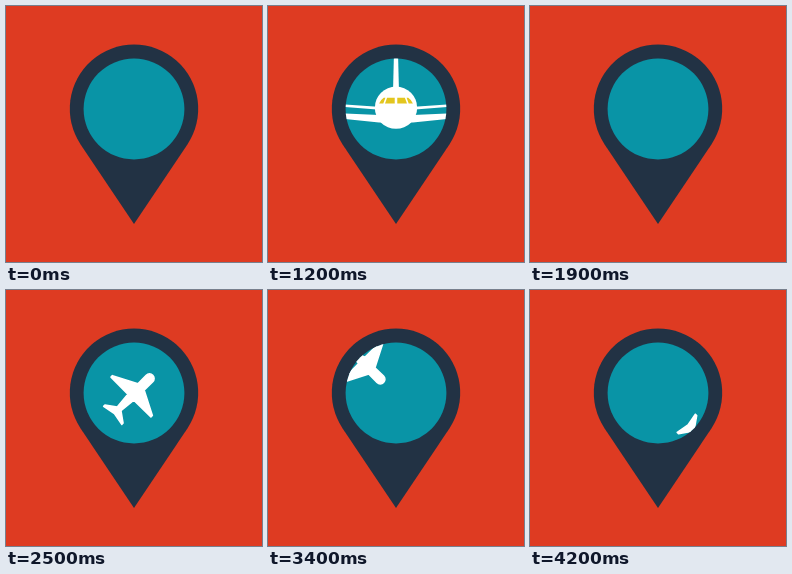
These frames come from a looping animation (256 px wide and 256 px high, 4300 ms). An HTML page:

```html
<!DOCTYPE html>
<html lang="en">
<head>
<meta charset="utf-8">
<title>Flight pin</title>
<style>
html, body { margin: 0; width: 100%; height: 100%; overflow: hidden; background: #de3b22; }
svg { display: block; width: 100%; height: 100%; }
</style>
</head>
<body>
<svg viewBox="0 0 256 256">
  <defs>
    <clipPath id="porthole"><circle cx="128" cy="103" r="50.4"/></clipPath>
  </defs>
  <rect width="256" height="256" fill="#de3b22"/>
  <path d="M74.6 138.4A64.2 64.2 0 1 1 181.4 138.4L128 218Z" fill="#223244"/>
  <circle cx="128" cy="103" r="50.4" fill="#0994a6"/>
  <g clip-path="url(#porthole)" fill="#fff">
    <!-- Head-on view, fuselage radius 1 -->
    <g id="front">
      <path d="M-.08-3.2H.08L.14-.8H-.14Z"/>
      <path d="M-2.75-.18L0 .02L2.75-.18V-.06L0 .16L-2.75-.06Z"/>
      <path d="M-4.95.17L-.8.34H.8L4.95.17V.28L.8.7H-.8L-4.95.28Z"/>
      <circle cx="-2.74" cy="1.02" r=".48"/>
      <circle cx="2.74" cy="1.02" r=".48"/>
      <circle r="1"/>
      <g fill="#e3c61f">
        <path id="panes" d="M-.06-.47H-.42L-.52-.2H-.06ZM-.5-.47L-.6-.2H-.8Q-.72-.38-.58-.47Z"/>
        <use href="#panes" transform="scale(-1 1)"/>
      </g>
    </g>
    <!-- View from above, heading right, origin at the nose centre -->
    <g id="top" stroke="#fff" stroke-width="1.6" stroke-linejoin="round">
      <path d="M0-4.6A4.6 4.6 0 0 1 0 4.6L-12 4.4L-24.2 28.2L-26.2 28.2L-26.4 4.2L-43 2.6L-50.2 12.8L-52 12.8L-49.6 0L-52-12.8L-50.2-12.8L-43-2.6L-26.4-4.2L-26.2-28.2L-24.2-28.2L-12-4.4Z"/>
    </g>
  </g>
</svg>
<script>
const LOOP = 4300, STEP = 100;
const front = document.getElementById('front');
const topView = document.getElementById('top');

function place(el, visible, transform) {
  el.style.display = visible ? '' : 'none';
  if (visible) el.setAttribute('transform', transform);
}

function approach(t) {
  const size = 10.2 * Math.pow(1.2, (t - 800) / 100);
  const y = t < 900
    ? 98.2 + (t - 900) * 0.0375
    : 102.5 - 4.3 * Math.exp((900 - t) / 180);
  return `translate(128 ${y}) scale(${size})`;
}

function flyUp(t) {
  const d = (t - 2500) * 0.098;
  return `translate(${143.5 + d} ${88.5 - d}) rotate(-45)`;
}

function flyDown(t) {
  const d = (t - 3400) * 0.101;
  return `translate(${112.3 + d} ${89.3 + d}) rotate(45)`;
}

function draw(time) {
  const t = Math.floor((time % LOOP) / STEP) * STEP;
  place(front, t >= 400 && t < 1900, approach(t));
  place(topView, t >= 2000, t < 3150 ? flyUp(t) : flyDown(t));
}

const start = performance.now();
function tick() {
  draw(performance.now() - start);
  requestAnimationFrame(tick);
}
tick();
</script>
</body>
</html>
```
